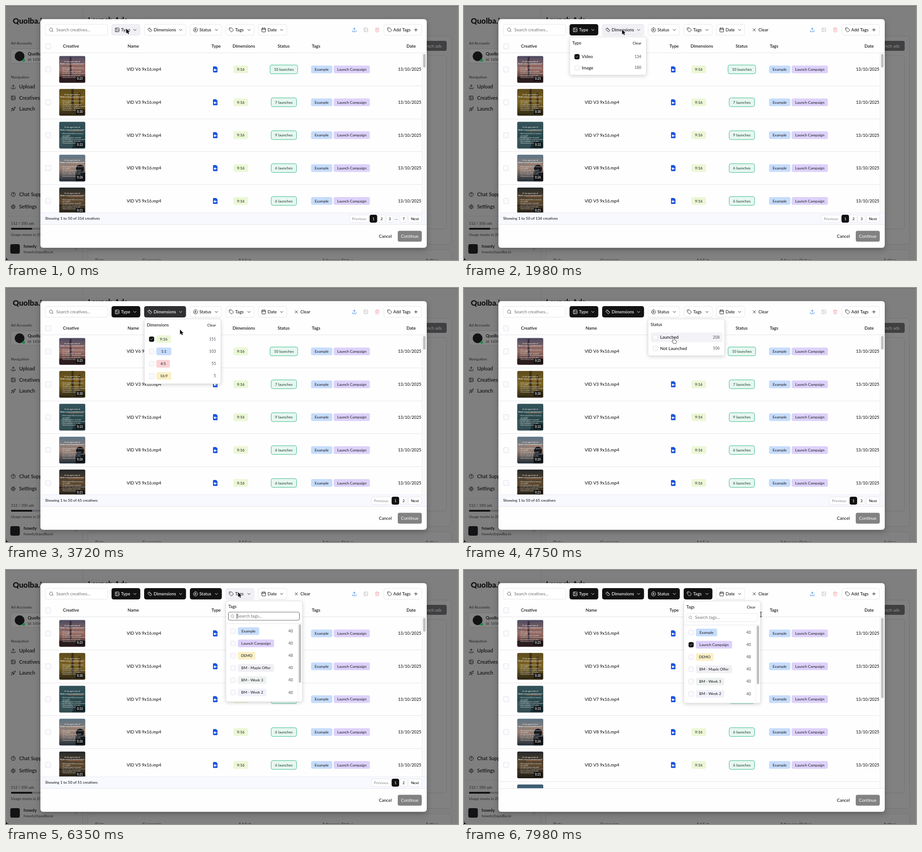
An HTML page with a canvas for the animation above (8 s loop, 998 by 561 pixels).

```html
<!DOCTYPE html>
<html lang="en">
<head>
<meta charset="utf-8">
<title>Creative library filters</title>
<style>
html, body { margin: 0; width: 100%; height: 100%; overflow: hidden; background: #7f7f7f; }
canvas { display: block; width: 998px; height: 561px; }
</style>
</head>
<body>
<canvas id="stage" width="998" height="561"></canvas>
<script>
const ctx = document.getElementById('stage').getContext('2d');
const LOOP = 8000;
const INK = '#18181b', LINE = '#e6e6ec', GREEN = '#ecf7d6', BLUE = '#c6dcfc', VIOLET = '#ddd1fb';

const ICONS = {
  search: 'M11 3a8 8 0 1 0 .01 0M21 21l-4.3-4.3',
  image: 'M5 3h14a2 2 0 0 1 2 2v14a2 2 0 0 1-2 2H5a2 2 0 0 1-2-2V5a2 2 0 0 1 2-2zM9 7a2 2 0 1 0 .01 0M21 15l-3-3a2 2 0 0 0-3 0L6 21',
  ruler: 'M21.3 15.3l-6 6a1 1 0 0 1-1.4 0L2.7 10a1 1 0 0 1 0-1.4l6-6a1 1 0 0 1 1.4 0L21.3 14a1 1 0 0 1 0 1.4zM14.5 12.5l2-2M11.5 9.5l2-2M8.5 6.5l2-2',
  play: 'M12 2a10 10 0 1 0 .01 0M10 8l6 4-6 4z',
  tag: 'M12.6 2.6A2 2 0 0 0 11.2 2H4a2 2 0 0 0-2 2v7.2a2 2 0 0 0 .6 1.4l8.7 8.7a2.4 2.4 0 0 0 3.4 0l6.6-6.6a2.4 2.4 0 0 0 0-3.4zM7.5 7v1',
  calendar: 'M8 2v4M16 2v4M5 4h14a2 2 0 0 1 2 2v14a2 2 0 0 1-2 2H5a2 2 0 0 1-2-2V6a2 2 0 0 1 2-2zM3 10h18',
  chevron: 'M6 9l6 6 6-6',
  close: 'M18 6L6 18M6 6l12 12',
  plus: 'M5 12h14M12 5v14',
  check: 'M4 12l5 5L20 6',
  upload: 'M21 15v4a2 2 0 0 1-2 2H5a2 2 0 0 1-2-2v-4M17 8l-5-5-5 5M12 3v12',
  trash: 'M3 6h18M19 6v14a2 2 0 0 1-2 2H7a2 2 0 0 1-2-2V6M8 6V4a2 2 0 0 1 2-2h4a2 2 0 0 1 2 2v2M10 11v6M14 11v6',
  rocket: 'M12 15l-3-3a22 22 0 0 1 13-10c0 3-1 9-6 12zM9 12H4s.5-3 2-4c1.6-1 5 0 5 0M12 15v5s3-.5 4-2c1-1.6 0-5 0-5M4.5 16.5c-1.5 1-2 5-2 5s3.7-.5 5-2',
  help: 'M12 2a10 10 0 1 0 .01 0M9 9a3 3 0 0 1 6 1c0 2-3 3-3 3M12 17v.1',
  gear: 'M12 9a3 3 0 1 0 .01 0M12 4a8 8 0 1 0 .01 0M12 1v3M12 20v3M1 12h3M20 12h3M4.2 4.2l2.1 2.1M17.7 17.7l2.1 2.1M4.2 19.8l2.1-2.1M17.7 6.3l2.1-2.1'
};
for (const k in ICONS) ICONS[k] = new Path2D(ICONS[k]);

// ---------- drawing helpers ----------
function text(s, x, cy, { size = 9.6, weight = 500, color = INK, align = 'left' } = {}) {
  ctx.font = `${weight} ${size}px Lato, "Open Sans", sans-serif`;
  ctx.fillStyle = color;
  ctx.textAlign = align;
  ctx.fillText(s, x, cy + size * 0.36);
}

function box(x, y, w, h, r, fill, stroke, lw = 1) {
  ctx.beginPath();
  ctx.roundRect(x, y, w, h, r);
  if (fill) { ctx.fillStyle = fill; ctx.fill(); }
  if (stroke) { ctx.strokeStyle = stroke; ctx.lineWidth = lw; ctx.stroke(); }
}

function rect(x, y, w, h, fill) {
  ctx.fillStyle = fill;
  ctx.fillRect(x, y, w, h);
}

function disc(x, y, r, fill) {
  ctx.beginPath();
  ctx.arc(x, y, r, 0, 7);
  ctx.fillStyle = fill;
  ctx.fill();
}

function icon(name, cx, cy, color = INK, size = 11) {
  const k = size / 24;
  ctx.save();
  ctx.translate(cx - size / 2, cy - size / 2);
  ctx.scale(k, k);
  ctx.strokeStyle = color;
  ctx.lineWidth = 2.1;
  ctx.lineCap = ctx.lineJoin = 'round';
  ctx.stroke(ICONS[name]);
  ctx.restore();
}

function pill(label, x, cy, w, fill) {
  box(x, cy - 8.5, w, 17, 3.5, fill);
  text(label, x + w / 2, cy, { size: 8.3, color: '#27272a', align: 'center' });
}

function checkbox(cx, cy, size, on) {
  const h = size / 2;
  box(cx - h, cy - h, size, size, 2.5, on ? '#111' : '#fbfbfe', on ? '#111' : '#dedeea');
  if (on) icon('check', cx, cy, '#fff', 8);
}

function shadowed(draw, blur, dy, color) {
  ctx.save();
  ctx.shadowColor = color;
  ctx.shadowBlur = blur;
  ctx.shadowOffsetY = dy;
  draw();
  ctx.restore();
}

// ---------- timeline ----------
const FILTERS = [
  { name: 'Type', icon: 'image', x: 233, w: 63.5, open: 60, pick: 1150, close: 2130,
    rows: [['Video', 134], ['Image', 180]] },
  { name: 'Dimensions', icon: 'ruler', x: 305, w: 92.5, open: 2130, pick: 3150, close: 4200,
    rows: [['9:16', 151, GREEN, 32], ['1:1', 103, BLUE, 33], ['4:5', 55, '#fbd1d5', 30], ['16:9', 5, '#faf0c6', 33]] },
  { name: 'Status', icon: 'play', x: 406, w: 70.5, open: 4200, pick: 5000, close: 6210,
    rows: [['Launched', 208], ['Not Launched', 106]] },
  { name: 'Tags', icon: 'tag', x: 485, w: 63.5, open: 6210, pick: 7330, close: 9000, picked: 1,
    rows: [['Example', 40, BLUE, 47], ['Launch Campaign', 40, VIOLET, 80], ['DEMO', 48, '#faf0c6', 39],
           ['BM - Maple Offer', 40, '#f0f0f4', 80], ['BM - Week 3', 40, '#eef2f0', 63], ['BM - Week 2', 40, '#f0f1fa', 63]] },
  { name: 'Date', icon: 'calendar', x: 556.5, w: 64, open: 9000, pick: 9000, close: 9000, rows: [] }
];

// time, x, y of the pointer tip
const PATH = [
  [0, 265.5, 50], [430, 265.5, 50], [770, 284, 121], [920, 276, 112], [1280, 276, 112],
  [1900, 349, 52], [2300, 349, 52], [2850, 344, 111], [3480, 344, 111], [3720, 384, 92],
  [3800, 394, 62], [4020, 440, 50], [4380, 440, 50], [4720, 463, 110], [5250, 463, 110],
  [5950, 512.5, 49], [6530, 512.5, 49], [7100, 556, 163], [7500, 556, 163], [8000, 656, 98]
];

function slope(i, c) {
  const a = PATH[i - 1], p = PATH[i], b = PATH[i + 1];
  if (!a || !b || (p[c] - a[c]) * (b[c] - p[c]) <= 0) return 0;
  return (b[c] - a[c]) / (b[0] - a[0]);
}

function pointer(t) {
  let i = 0;
  while (i < PATH.length - 2 && t >= PATH[i + 1][0]) i++;
  const p = PATH[i], q = PATH[i + 1], d = q[0] - p[0], u = Math.min(1, (t - p[0]) / d);
  return [1, 2].map(c => {
    const v = 1 - u;
    return p[c] * v * v * (1 + 2 * u) + q[c] * u * u * (3 - 2 * u) +
      d * u * v * (slope(i, c) * v - slope(i + 1, c) * u);
  });
}

const inside = ([px, py], x, y, w, h) => px >= x && px <= x + w && py >= y && py <= y + h;

function layout(f, t) {
  const on = t >= f.pick, shift = on ? 3 : 0;
  if (f.name === 'Tags') return { on, h: 223.5 + shift, top: 135 + shift, step: 27.1, shift };
  if (f.name === 'Dimensions') return { on, h: 141 + shift, top: 110 + shift, step: 27.1, shift };
  return { on, h: 82 + shift, top: 109 + shift, step: 24.4, shift };
}

// ---------- dimmed page ----------
function page() {
  const side = { size: 8.3, color: '#2b2b2e' }, dark = '#0c0c0e', edge = '#737376';
  rect(0, 0, 998, 561, '#7f7f7f');
  rect(0, 0, 998, 1, '#6a6a6c');
  rect(169, 0, 1, 561, edge);
  text('Quolba.io', 15, 33, { size: 17, weight: 800, color: dark });
  text('Launch Ads', 181, 31, { size: 17, weight: 700, color: dark });

  text('Ad Accounts', 11, 82, side);
  box(10.5, 94.5, 148, 32, 5, '#858585', edge);
  disc(30, 111, 10.7, '#131316');
  disc(39, 120, 3, '#1a8a4a');
  text('Quolba', 48, 106, { weight: 600, color: dark });
  text('id: 165482093', 48, 118, side);

  text('Navigation', 11, 157, side);
  const nav = [['Upload', 'upload', 178.5], ['Creatives', 'image', 203], ['Launch', 'rocket', 227.5],
               ['Chat Support', 'help', 416], ['Settings', 'gear', 443.5]];
  for (const [label, glyph, y] of nav) {
    icon(glyph, 16, y, dark);
    text(label, 29, y, { size: 11.1, color: dark });
  }

  rect(0, 464, 169, 1, '#777779');
  text('112 / 350 ads', 11, 480, side);
  box(11, 490, 147, 4, 2, '#666669');
  box(11, 490, 47, 4, 2, '#111113');
  text('Usage resets in 25 days', 11, 505, side);
  box(9.5, 526, 21, 21, 4, '#131316');
  text('howdy', 39, 531, { weight: 600, color: dark });
  text('howdy@quolba.io', 39, 543.5, side);
  icon('chevron', 155, 537, '#3a3a3c', 9);

  box(180.5, 66.5, 803, 460, 6, '#818181', edge);
  box(880, 77, 93, 22, 4, '#404042');
  text('Launch ads', 962, 88.5, { color: '#8d8d8f', align: 'right' });
  box(192.5, 109.5, 780, 383, 5, null, edge);
  box(180.5, 538.5, 803, 60, 6, '#818181', edge);
  [['Date', 197], ['Campaign', 301], ['Ad Set', 513], ['Adsource Status', 698], ['Action', 926]]
    .forEach(([s, x]) => text(s, x, 562, { color: '#2b2b2e' }));
  ctx.fillStyle = '#0a0a0a';
  ctx.beginPath();
  ctx.moveTo(0, 553);
  ctx.quadraticCurveTo(0, 561, 8, 561);
  ctx.lineTo(0, 561);
  ctx.fill();
}

// ---------- table ----------
const ROWS = [
  ['VID V6 9x16.mp4', '10 launches', '0:25', ['#4b4a60', '#9a6f66', '#2a1a1a']],
  ['VID V3 9x16.mp4', '7 launches', '0:30', ['#5c4a1c', '#7d6524', '#2b2413']],
  ['VID V7 9x16.mp4', '9 launches', '0:33', ['#35525a', '#2a4a4e', '#152a30']],
  ['VID V8 9x16.mp4', '6 launches', '0:26', ['#5b7486', '#9c8274', '#1f2c38']],
  ['VID V5 9x16.mp4', '6 launches', '0:21', ['#25282a', '#5f4a30', '#1c1a14']],
  ['VID V4 9x16.mp4', '6 launches', '0:28', ['#3b5a70', '#56707c', '#20303a']]
];
const COPY = ['• Batch upload 100vis af annoncer', '  på et øjeblik', '• Gruppér kreativer automatisk',
              '• Se alt i 9x16, 1x1 og 4x5 placements', '• Gem standarder for Creative', '  Enhancements, manager'];

function thumb(i, cy) {
  const x = 117.5, y = cy - 29.5, w = 57.5, h = 59, [, , time, tones] = ROWS[i];
  const g = ctx.createLinearGradient(0, y, 0, y + h);
  tones.forEach((c, k) => g.addColorStop(k / 2, c));
  ctx.save();
  box(x, y, w, h, 3, g);
  ctx.clip();
  if (i === 0) { rect(x + 23, y + 2, 4, 50, '#3a2c36'); rect(x, y + 46, w, 13, '#2b1c1e'); }
  if (i === 1) { rect(x + 27, y, 5, h, '#37301a'); rect(x + 43, y + 8, 4, h, '#3d331a'); }
  if (i === 2) { ctx.globalAlpha = 0.35; disc(x + 14, y + 48, 17, '#6b8a8c'); ctx.globalAlpha = 1; }
  if (i === 3) { disc(x + 46, y + 31, 9, '#15181d'); rect(x + 36, y + 37, 22, 22, '#15181d'); }
  if (i === 4) rect(x, y + 38, w, 3, '#2b2217');
  const mid = { align: 'center', color: '#f4f4f4' };
  text('Er du også træt af', x + 29, y + 12, { ...mid, size: 4.4 });
  text('Rodet annonceadministrator?', x + 29, y + 17.5, { ...mid, size: 4.1, weight: 700 });
  rect(x + 20, y + 20, 33, 0.7, '#d9743c');
  COPY.forEach((s, k) => text(s, x + 6, y + 26.5 + k * 4.1, { size: 3.1, color: '#dcdcdc' }));
  box(x + 36.5, y + 45, 18.5, 10.5, 2, 'rgba(12,12,14,.85)');
  text(time, x + 45.7, y + 50.4, { size: 6.6, weight: 600, color: '#fff', align: 'center' });
  ctx.restore();
}

function fileIcon(cx, cy) {
  ctx.fillStyle = '#1d55dc';
  ctx.beginPath();
  ctx.roundRect(cx - 5, cy - 6.7, 10, 13.4, 1.6);
  ctx.fill();
  ctx.fillStyle = '#fefefe';
  ctx.beginPath();
  ctx.moveTo(cx + 1.6, cy - 7); ctx.lineTo(cx + 5.3, cy - 7); ctx.lineTo(cx + 5.3, cy - 3.2);
  ctx.fill();
  box(cx - 3, cy - 0.8, 4, 4, 0.8, '#fff');
  ctx.beginPath();
  ctx.moveTo(cx + 1.2, cy + 1.2); ctx.lineTo(cx + 3.2, cy - 0.5); ctx.lineTo(cx + 3.2, cy + 2.9);
  ctx.fill();
}

function table(bottom) {
  const head = { weight: 600, align: 'center' };
  checkbox(93, 89, 11.5);
  [['Creative', 143.5], ['Name', 281], ['Type', 464], ['Dimensions', 525], ['Status', 613], ['Tags', 684.5], ['Date', 894.5]]
    .forEach(([s, x]) => text(s, x, 89, head));
  rect(76, 103, 853, 1, LINE);
  ctx.save();
  ctx.beginPath();
  ctx.rect(76, 104, 853, bottom - 104);
  ctx.clip();
  ROWS.forEach(([name, status], i) => {
    const y = 140 + i * 72.65, w = i ? 56 : 61;
    checkbox(93, y, 11.5);
    thumb(i, y);
    text(name, 266.5, y);
    fileIcon(462, y);
    pill('9:16', 502, y, 32.5, GREEN);
    box(613.5 - w / 2, y - 9.7, w, 19.4, 4, '#e7f7f0', '#36b98c');
    text(status, 613.5, y, { size: 8.3, color: '#27493d', align: 'center' });
    pill('Example', 673.5, y, 47, BLUE);
    pill('Launch Campaign', 723.5, y, 80, VIOLET);
    text('13/10/2025', 917, y, { size: 9.3, align: 'right' });
    rect(76, Math.round(y + 36), 843, 1, LINE);
  });
  rect(918, 104, 11, bottom - 104, '#fafafa');
  rect(918, 104, 1, bottom - 104, '#ebebeb');
  box(921, 106, 5.5, bottom > 460 ? 177 : 30, 2.7, '#c1c1c1');
  ctx.restore();
}

function pager(total, pages) {
  const small = { size: 8.3, align: 'center' };
  rect(76, 456, 853, 26, '#f7f9fe');
  rect(76, 456, 853, 1, '#ececf2');
  text(`Showing 1 to 50 of ${total} creatives`, 86.5, 469.5, { size: 8.3 });
  box(888.5, 461.5, 29, 16.5, 3, '#fff', LINE);
  text('Next', 903, 469.7, small);
  let x = 870;
  for (const p of [...pages].reverse()) {
    if (p === '…') {
      text(p, x + 10, 468.7, small);
      x += 5.5;
    } else {
      const on = p === 1;
      box(x, 461.5, 15.5, 16.5, 3, on ? '#111' : '#fff', on ? '#111' : LINE);
      text(p, x + 7.8, 469.7, { ...small, color: on ? '#fff' : INK });
    }
    x -= 18;
  }
  box(x - 27, 461.5, 42.5, 16.5, 3, '#fff', LINE);
  text('Previous', x - 5.7, 469.7, { ...small, color: '#8f8f94' });
}

// ---------- toolbar and menus ----------
function toolbar(t, aim) {
  box(86.5, 40.5, 138, 24, 4, '#fff', LINE);
  icon('search', 100, 52.7, '#55555c');
  text('Search creatives...', 111, 52.7, { color: '#73737a', weight: 400 });
  for (const f of FILTERS) {
    const on = t >= f.pick, hot = inside(aim, f.x, 40, f.w, 25);
    const fill = on ? (hot ? '#2f2f31' : '#121212') : hot ? '#f0f0f5' : '#fff';
    const fg = on ? '#fff' : INK;
    box(f.x + 0.5, 40.5, f.w - 1, 24, 4, fill, on ? fill : LINE);
    icon(f.icon, f.x + 12.5, 52.7, fg);
    text(f.name, f.x + 21, 52.7, { color: fg });
    icon('chevron', f.x + f.w - 12, 52.9, fg);
  }
  if (t >= FILTERS[0].pick) {
    icon('close', 641, 52.7);
    text('Clear', 650, 52.7);
  }
  icon('upload', 769, 52.7, '#2f7ff0');
  icon('image', 794.5, 52.7, '#bcbcc0');
  icon('trash', 819.5, 52.7, '#f3a3a8');
  box(834.5, 40.5, 83, 24, 4, '#fff', LINE);
  icon('tag', 847, 52.7);
  text('Add Tags', 855, 52.7);
  icon('plus', 905, 52.7);
}

function tagSearch(f, m, t) {
  const y = 102 + m.shift, focus = !m.on;
  box(f.x + 6, y - 9, 157, 18, 4, '#fff', focus ? '#6b6b72' : LINE, focus ? 1.2 : 1);
  icon('search', f.x + 15, y, '#77777e', 9);
  text('Search tags...', f.x + 25, y, { color: '#73737a', weight: 400 });
  if (focus && (t - f.open) % 1000 < 500) rect(f.x + 24.5, y - 6, 1, 12, INK);
  rect(f.x + 1, y + 16, 168, 1, LINE);
  rect(f.x + 159, y + 17, 1, m.h - 51 - m.shift, '#eeeeee');
  box(f.x + 161.5, y + 18, 5, 129, 2.5, '#bdbdbd');
}

function menu(f, t, aim) {
  const grow = Math.min(1, (t - f.open) / 150), fade = Math.min(1, (f.close + 100 - t) / 100);
  if (grow <= 0 || fade <= 0) return;
  const m = layout(f, t), tags = f.name === 'Tags', a = (1 - (1 - grow) ** 2) * fade, k = 0.95 + 0.05 * a;
  ctx.save();
  ctx.globalAlpha = a;
  ctx.translate(f.x, 68);
  ctx.scale(k, k);
  ctx.translate(-f.x, -68);
  shadowed(() => box(f.x + 0.5, 68.5, 169, m.h - 1, 4, '#fff'), 8, 2, 'rgba(0,0,0,.18)');
  box(f.x + 0.5, 68.5, 169, m.h - 1, 4, null, '#e2e2e6');
  text(f.name, f.x + 6, m.on ? 82 : 80.3, { size: 9.4 });
  if (m.on) text('Clear', f.x + 158.5, 82, { size: 8.3, align: 'right' });
  if (tags) tagSearch(f, m, t);
  const right = f.x + (tags ? 148.5 : 158.5);
  f.rows.forEach(([label, count, fill, w], i) => {
    const y = m.top + i * m.step;
    if (inside(aim, f.x + 6, y - 10.5, right - f.x, 21)) box(f.x + 6, y - 10.7, right - f.x, 21.4, 3, '#f3f3f7');
    checkbox(f.x + 16.5, y, 10.5, m.on && i === (f.picked || 0));
    if (fill) pill(label, f.x + 27, y, w, fill);
    else text(label, f.x + 27, y);
    text(count, right, y, { size: 8.6, color: '#5b5b66', align: 'right' });
  });
  ctx.restore();
}

// ---------- pointer ----------
const ARROW = new Path2D('M0 0V10.8L2.5 8.5L4.2 12.3L6.1 11.5L4.4 7.8H7.7Z');
const HAND = new Path2D('M-1 1a1.1 1.1 0 0 1 2.2 0V5l3.6.8q1.3.4 1.1 1.8l-.7 3.2-.7 1.7h-4.6l-3-3.8q-.8-1.3.3-1.7l1.8 1z');
const BEAM = new Path2D('M-2-5.5Q0-5.5 0-4.5Q0-5.5 2-5.5M0-4.5V4.5M-2 5.5Q0 5.5 0 4.5Q0 5.5 2 5.5');

function cursor(t, at) {
  const f = FILTERS.find(f => t >= f.open && t < f.close);
  const m = f && layout(f, t);
  const typing = f && f.name === 'Tags' && inside(at, 491, 92 + m.shift, 170, 20);
  const hand = f && inside(at, f.x + 6, m.top - 10.7, 158, (f.rows.length - 1) * m.step + 21.4);
  ctx.save();
  ctx.translate(...at);
  ctx.lineJoin = 'round';
  ctx.strokeStyle = typing || !hand ? '#fff' : '#111';
  ctx.lineWidth = typing ? 2.4 : 1.3;
  if (typing) {
    ctx.stroke(BEAM);
    ctx.strokeStyle = '#111';
    ctx.lineWidth = 1.1;
    ctx.stroke(BEAM);
  } else {
    const shape = hand ? HAND : ARROW;
    ctx.stroke(shape);
    ctx.fillStyle = hand ? '#fff' : '#0a0a0a';
    ctx.fill(shape);
  }
  ctx.restore();
}

const RESULTS = [[314, [1, 2, 3, '…', 7]], [134, [1, 2, 3]], [65, [1, 2]], [51, [1, 2]]];

function draw(t) {
  const at = pointer(t), aim = pointer(Math.min(t + 70, LOOP));
  const picked = FILTERS.filter(f => t >= f.pick).length;
  page();
  shadowed(() => box(76, 29, 853, 505, 6, '#fefefe'), 14, 4, 'rgba(0,0,0,.25)');
  toolbar(t, aim);
  table(picked < 4 ? 456 : 482);
  if (picked < 4) pager(...RESULTS[picked]);
  rect(76, 482, 853, 1, LINE);
  text('Cancel', 837.5, 508.5, { align: 'center' });
  box(865, 496.5, 53, 24, 4, '#828282');
  text('Continue', 891.5, 508.5, { align: 'center', color: '#f2f2f2' });
  for (const f of FILTERS) menu(f, t, aim);
  cursor(t, at);
}

const start = performance.now();
function tick(now) {
  draw(Math.max(0, now - start) % LOOP);
  requestAnimationFrame(tick);
}
draw(0);
requestAnimationFrame(tick);
</script>
</body>
</html>
```
